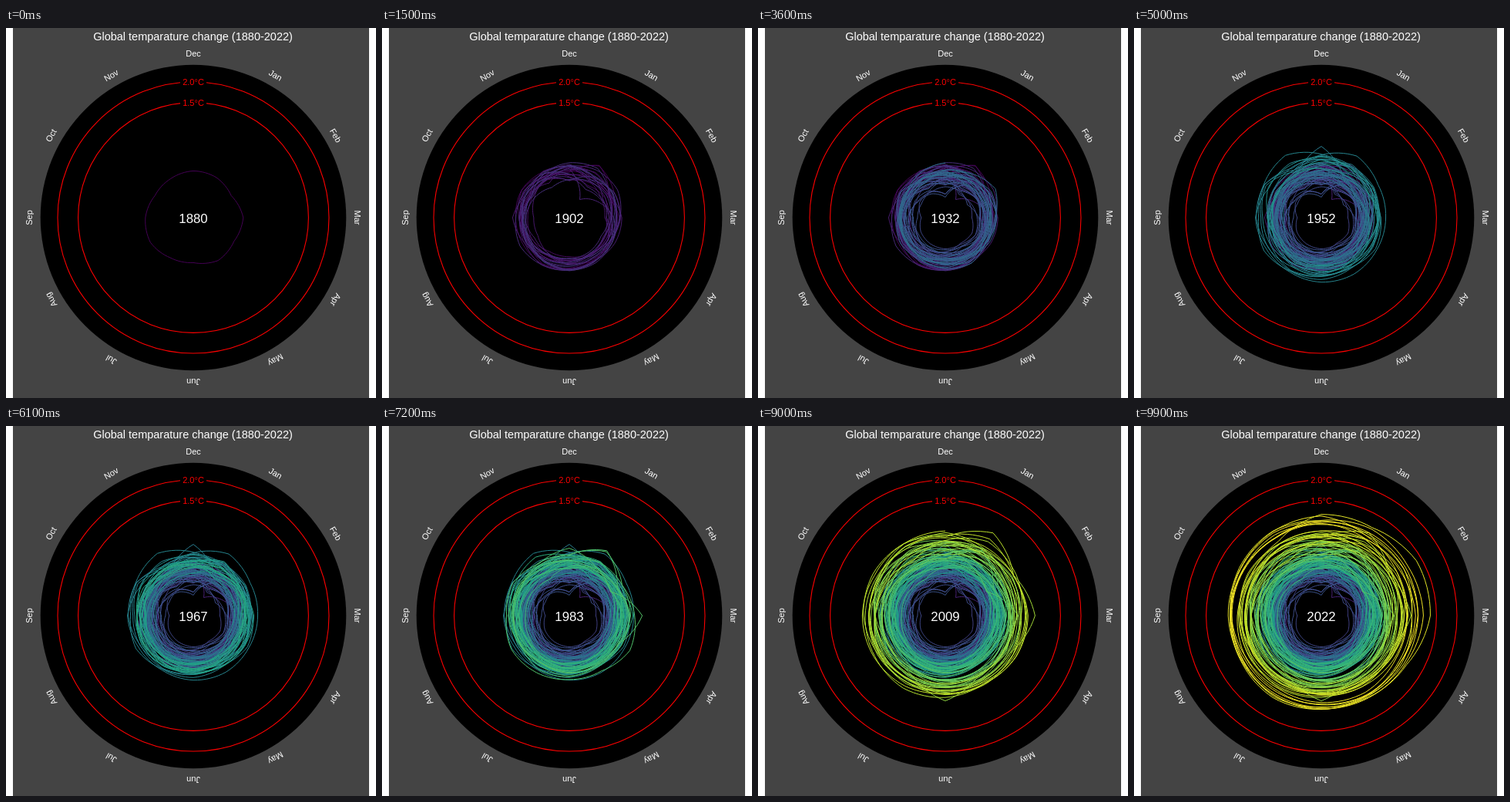
Animation, 480 px wide and 480 px high, one loop 10000 ms. Source, as an HTML page:

```html
<!DOCTYPE html>
<html lang="en">
<head>
<meta charset="utf-8">
<title>Global temperature spiral</title>
<style>
  html, body { margin: 0; width: 100%; height: 100%; overflow: hidden; background: #fff; }
  svg { display: block; width: 480px; height: 480px; }
  text { font: 11px "Liberation Sans", Arial, sans-serif; fill: #fff; text-anchor: middle; }
  #years path { fill: none; stroke-linejoin: round; }
  .limit { fill: none; stroke: #f00; stroke-width: 1.07; }
</style>
</head>
<body>
<svg viewBox="0 0 480 480">
  <rect x="9" width="462" height="480" fill="#444"/>
  <text x="242.5" y="15.7" style="font-size:14.5px">Global temparature change (1880-2022)</text>
  <g transform="translate(243 246)">
    <circle r="198.3"/>
    <g id="years"></g>
    <g id="scale"></g>
    <text id="year" y="7" style="font-size:16.8px"></text>
  </g>
</svg>
<script>
const FIRST = 1880, LAST = 2022, SPAN = LAST - FIRST;
const FRAMES = 100, STEP = 100;
const $ = id => document.getElementById(id);
const lerp = (a, b, f) => a + (b - a) * f;

// Anomalies are in hundredths of a degree
const trend = [
  [1880, -12], [1888, -27], [1900, -15], [1908, -44], [1917, -38], [1926, -21],
  [1936, -15], [1944, 17], [1950, -11], [1960, 0], [1976, -2], [1990, 36],
  [2000, 48], [2013, 67], [2016, 95], [2022, 93]
];
const firstYear = [-18, -24, -9, -16, -10, -21, -18, -10, -14, -23, -21, -17];
// Record months: year, month, anomaly
const records = [
  [1882, 1, 16], [1893, 1, -80], [1893, 2, -52], [1916, 12, -81], [1939, 12, 43],
  [1981, 1, 52], [1983, 3, 47], [1998, 6, 77], [2002, 3, 88], [2007, 1, 102],
  [2015, 12, 116], [2016, 1, 117], [2016, 2, 137], [2016, 3, 135], [2016, 4, 109]
];

let seed = 7;
const random = () => (seed = seed * 16807 % 2147483647) / 2147483647;
const wobble = () => random() + random() - 1;

function mean(year) {
  const k = Math.max(1, trend.findIndex(p => p[0] >= year));
  const [[y0, a], [y1, b]] = [trend[k - 1], trend[k]];
  return lerp(a, b, (year - y0) / (y1 - y0));
}

// Months drift around the yearly mean, more so in winter; recent springs run warm
let drift = 0;
const months = Array.from({ length: SPAN + 1 }, (_, i) => {
  const base = mean(FIRST + i) + 14 * wobble();
  const late = Math.max(0, i / SPAN - 0.8) / 0.2;
  return firstYear.map((_, m) => {
    drift = drift * 0.5 + 2 * wobble();
    const spread = 9 + 2.5 * Math.cos((m + 1) * Math.PI / 6);
    return base + drift * spread * (1 - 0.3 * late) + 6 * late * Math.cos((m - 1.5) * Math.PI / 6);
  });
});
months[0] = firstYear;
for (const [year, month, value] of records) months[year - FIRST][month - 1] = value;

const radius = anomaly => 69.6 + 0.532 * anomaly;

// One turn from the previous December, with radius linear in angle
function turn(row, i) {
  const points = [(months[i - 1] || row)[11], ...row];
  const n = 8;
  return "M" + Array.from({ length: 12 * n + 1 }, (_, k) => {
    const m = Math.min(11, Math.floor(k / n));
    const r = radius(lerp(points[m], points[m + 1], k / n - m));
    const a = k / n * Math.PI / 6;
    return `${(r * Math.sin(a)).toFixed(2)} ${(-r * Math.cos(a)).toFixed(2)}`;
  }).join("L");
}

const viridis = "440154 482878 3e4a89 31688e 26828e 1f9e89 35b779 6ece58 b5de2b fde725"
  .split(" ").map(h => [0, 2, 4].map(p => parseInt(h.slice(p, p + 2), 16)));

function colour(t) {
  const x = t * 9, i = Math.min(8, Math.floor(x));
  return `rgb(${viridis[i].map((c, k) => Math.round(lerp(c, viridis[i + 1][k], x - i)))})`;
}

$("years").innerHTML = months.map((row, i) =>
  `<path d="${turn(row, i)}" stroke="${colour(i / SPAN)}"/>`).join("");

const limits = [1.5, 2].map(t => {
  const r = radius(t * 100);
  return `<circle class="limit" r="${r}"/><rect x="-17" y="${-r - 8}" width="34" height="16"/>
    <text y="${-r + 4}" style="fill:#f00">${t.toFixed(1)}°C</text>`;
});
const names = "Dec Jan Feb Mar Apr May Jun Jul Aug Sep Oct Nov".split(" ").map((name, i) =>
  `<text transform="rotate(${i * 30})" y="-209.3">${name}</text>`);
$("scale").innerHTML = [...limits, ...names].join("");

const paths = [...$("years").children];
const begin = performance.now();
let shown = -1;

function draw() {
  const frame = Math.floor((performance.now() - begin) / STEP) % FRAMES;
  const index = Math.round(frame * SPAN / (FRAMES - 1));
  if (index !== shown) {
    shown = index;
    paths.forEach((p, i) => p.style.display = i <= index ? "" : "none");
    $("year").textContent = FIRST + index;
  }
  requestAnimationFrame(draw);
}
draw();
</script>
</body>
</html>
```
